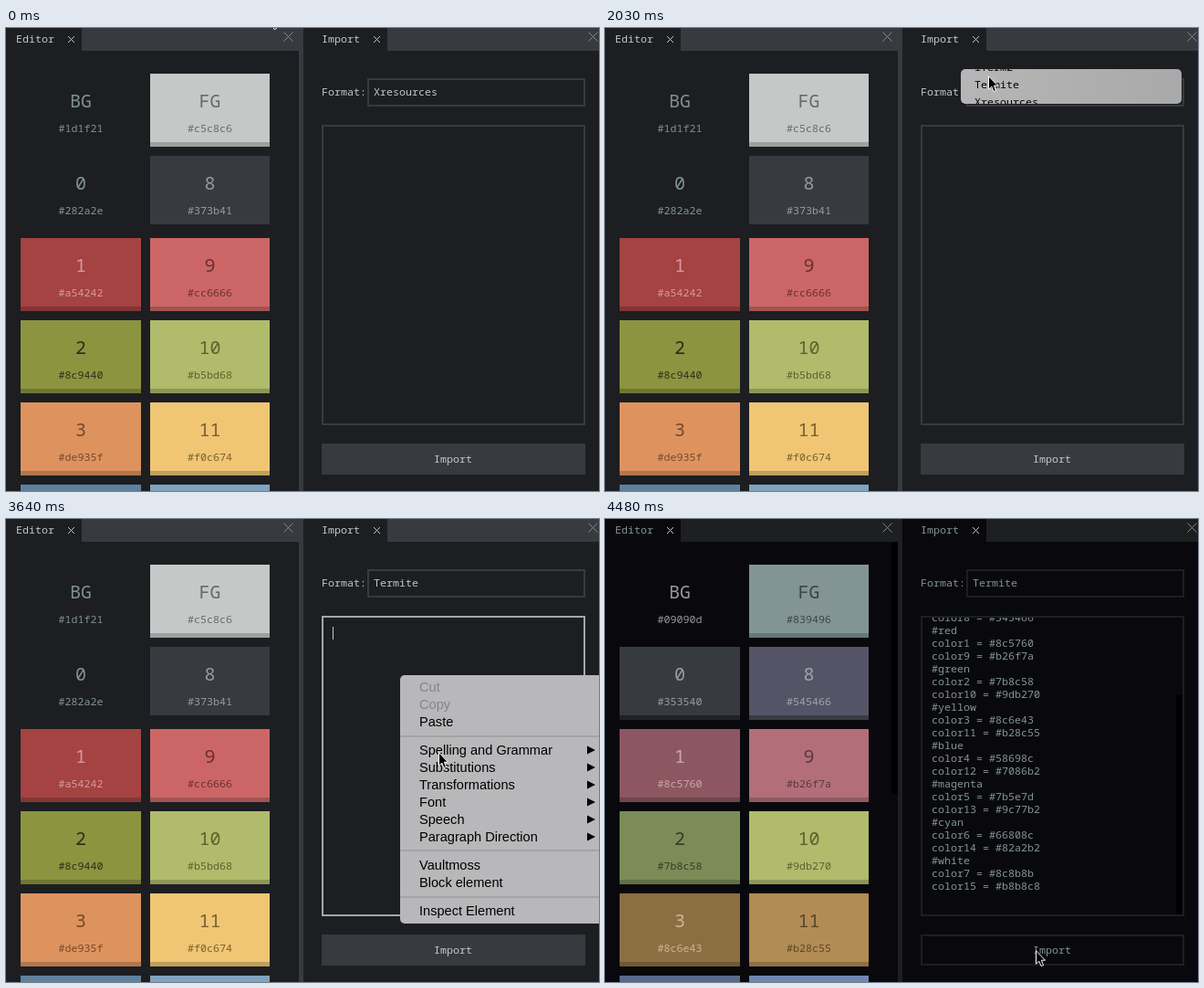
An HTML page that plays this animation: 650x507 px, repeating every 5.74 s.

```html
<!DOCTYPE html>
<html lang="en">
<head>
<meta charset="utf-8">
<title>Theme import</title>
<style>
  html, body { margin: 0; width: 100%; height: 100%; overflow: hidden; background: #1d1f21; }
  svg {
    --bg: #1c1e21; --bar: #373b40; --text: #c5c8c6;
    display: block; width: 650px; height: 507px; background: var(--bg);
    font: 11.667px "Noto Sans Mono", monospace;
  }
  svg.dark { --bg: #09090d; --bar: #1d1f21; --text: #839496; }
  text { fill: var(--text); white-space: pre; }
  rect { shape-rendering: crispEdges; }
  .bg { fill: var(--bg); }
  .bar { fill: var(--bar); }
  .box { fill: none; stroke: var(--bar); stroke-width: 2; }
  .box.focus { stroke: #a5a7a7; }
  .x { fill: none; stroke: #c5c8c6; }
  .x.dim { stroke: #85888b; }
  .mid { text-anchor: middle; }
  .big { font-size: 20px; }
  .round { shape-rendering: auto; fill: #b8b8ba; }
  .pop text { fill: #000; }
  .pop .off { fill: #848486; }
  .pop .on { fill: #fff; }
  .hot { fill: #0059c4; }
  .tick { fill: none; stroke: #000; stroke-width: 2; }
  .tick.on { fill: none; stroke: #fff; }
  #context { font: 14.6px "Liberation Sans", Arial, sans-serif; }
</style>
</head>
<body>
<svg id="stage" viewBox="0 0 650 507">
  <defs>
    <clipPath id="areaClip"><rect x="348" y="108" width="285" height="325"/></clipPath>
    <clipPath id="shrinkClip"><rect x="390" y="45" width="242" height="38" rx="5"/></clipPath>
    <linearGradient id="glass"><stop stop-color="#b6b6b6"/><stop offset="1" stop-color="#a9a9aa"/></linearGradient>
  </defs>

  <rect class="bar" x="83" width="243" height="25"/>
  <rect class="bar" x="321" width="5" height="507"/>
  <rect class="bar" x="418" width="232" height="25"/>
  <text x="11" y="16">Editor</text>
  <text x="346" y="16">Import</text>
  <path class="x" d="M68 9l7 7m0-7l-7 7M403 9l7 7m0-7l-7 7"/>
  <path class="x dim" d="M304.500 4.500l10 10m0-10l-10 10M638.500 4.500l10 10m0-10l-10 10"/>

  <g id="before"></g>
  <g id="after"></g>

  <text x="346" y="74">Format:</text>
  <rect class="box" x="397" y="56" width="237" height="29"/>
  <text id="format" x="403" y="74"></text>

  <rect id="area" class="box" x="347" y="107" width="287" height="327"/>
  <g id="pasted" clip-path="url(#areaClip)"></g>
  <rect id="caret" x="358" width="1" height="14" fill="#c5c8c6"/>

  <rect id="button" class="bar" x="346" y="455" width="289" height="34"/>
  <rect id="hover" class="box" x="347" y="456" width="287" height="32"/>
  <text class="mid" x="490" y="476">Import</text>

  <g id="scrollbars">
    <rect x="314" y="25" width="7" height="276"/>
    <rect x="626" y="193" width="7" height="240"/>
  </g>

  <g id="dropdown" class="pop"></g>
  <g id="shrink" class="pop" clip-path="url(#shrinkClip)">
    <rect x="390" y="45" width="242" height="38" fill="url(#glass)"/>
    <text x="405" y="47">iTerm2</text>
    <text x="405" y="66">Termite</text>
    <text x="405" y="85">Xresources</text>
  </g>
  <g id="context" class="pop"></g>

  <path id="cursor" d="M.5 .8V15.200L3.800 12.200L6 17.500L8.500 16.500L6.300 11.200H10.500Z" stroke="#fff"/>
</svg>

<script>
const LOOP = 5740, STEP = 70;
const $ = id => document.getElementById(id);
const show = (id, on) => { $(id).style.display = on ? '' : 'none'; };
const rect = (x, y, w, h, attrs) => `<rect x="${x}" y="${y}" width="${w}" height="${h}" ${attrs}/>`;
const text = (x, y, s, attrs = '') => `<text x="${x}" y="${y}" ${attrs}>${s}</text>`;

// Swatch: label, hex, ink, then optional shown fill and strip colour
const before = [
  ['BG', '1d1f21', '#7f9090', 'none', 'none'], ['FG', 'c5c8c6', '#676a69'],
  [0, '282a2e', '#839496', 'none', 'none'], [8, '373b41', '#989b9e', '#373b40', 'none'],
  [1, 'a54242', '#d49c9c'], [9, 'cc6666', '#6b2f31'],
  [2, '8c9440', '#2b2e1b'], [10, 'b5bd68', '#5b612f', '#b0bb6b'],
  [3, 'de935f', '#75492c'], [11, 'f0c674', '#75602f'],
  [4, '5f819d', '#263440'], [12, '81a2be', '#34424e']
];
const after = [
  ['BG', '09090d', '#97999a', 'none', 'none'], ['FG', '839496', '#394446'],
  [0, '353540', '#9b9da2', '#373a3e', '#202225'], [8, '545466', '#a4a4ae', '#545466', '#3a3b43'],
  [1, '8c5760', '#cfa6ac'], [9, 'b26f7a', '#5c383e'],
  [2, '7b8c58', '#343c28'], [10, '9db270', '#596032', '#b0bb6b'],
  [3, '8c6e43', '#cdb593'], [11, 'b28c55', '#594628'],
  [4, '58698c', '#b0b9cc'], [12, '7086b2', '#333e54']
];

function swatches(list) {
  return list.map(([label, hex, ink, fill = '#' + hex, strip], i) => {
    const x = i % 2 ? 158 : 16, w = i % 2 ? 131 : 132, y = 50 + 90 * (i >> 1);
    const mid = x + w / 2, style = `class="mid" style="fill:${ink}"`;
    const edge = strip ? `fill="${strip}"` : 'fill="#000" fill-opacity=".2"';
    return rect(x, y, w, strip ? 75 : 80, `fill="${fill}"`) + rect(x, y + 75, w, 5, edge) +
      text(mid, y + 37, label, style.replace('mid', 'mid big')) +
      text(mid, y + 64, '#' + hex, style);
  }).join('');
}

function pastedLines() {
  const groups = [
    ['red', '8c5760', 'b26f7a'], ['green', '7b8c58', '9db270'], ['yellow', '8c6e43', 'b28c55'],
    ['blue', '58698c', '7086b2'], ['magenta', '7b5e7d', '9c77b2'],
    ['cyan', '66808c', '82a2b2'], ['white', '8c8b8b', 'b8b8c8']
  ];
  const lines = ['color8 = #545466'];
  groups.forEach(([name, normal, bright], i) =>
    lines.push('#' + name, `color${i + 1} = #${normal}`, `color${i + 9} = #${bright}`));
  return lines.map((line, i) => text(358, 112 + 14 * i, line)).join('');
}

function dropdown(hot) {
  const rows = ['iTerm2', 'Termite', 'Xresources'].map((name, i) => {
    const y = 36 + 19 * i, on = i === hot ? 'on' : '';
    return (on && rect(386, y - 9, 239, 19, 'class="hot"')) +
      text(407, y + 4, name, `class="${on}"`) +
      (i === 2 ? `<path class="tick ${on}" d="M391 ${y - 1}l3.500 4.500l6-10"/>` : '');
  });
  return rect(386, 22, 239, 65, 'class="round" rx="5"') + rows.join('');
}

const menu = [
  ['Cut', 184], ['Copy', 203], ['Paste', 222], ['Spelling and Grammar', 253],
  ['Substitutions', 272], ['Transformations', 291], ['Font', 310], ['Speech', 329],
  ['Paragraph Direction', 348], ['Vaultmoss', 379], ['Block element', 398], ['Inspect Element', 429]
];
function contextMenu(hot) {
  const rows = menu.map(([name, y], i) => {
    const cls = i < 2 ? 'off' : i === hot ? 'on' : '';
    const arrow = i > 2 && i < 9
      ? `<path d="M637 ${y - 4.5}l9 4.500l-9 4.500z" fill="${cls ? '#fff' : '#000'}"/>` : '';
    return (cls === 'on' ? rect(432, y - 9, 218, 19, 'class="hot"') : '') +
      text(453, y + 5, name, `class="${cls}"`) + arrow;
  });
  const rules = [237, 362, 413].map(y => rect(432, y, 218, 2, 'fill="#a4a4a6"'));
  return rect(432, 171, 230, 272, 'class="round" rx="5"') + rules.join('') + rows.join('');
}

// Pointer moves: first step, last step, target x, y
const moves = [
  [210, 630, 411, 67], [980, 1050, 415, 67], [1470, 1750, 420, 52], [2100, 2450, 428, 170],
  [3150, 3220, 468, 271], [3290, 3360, 473, 221], [3640, 3780, 475, 354], [3850, 4130, 472, 472]
];
function pointer(t) {
  let x = 288, y = -16;
  for (const [from, to, tx, ty] of moves) {
    if (t < from) break;
    const p = Math.min(1, (t - from + STEP) / (to - from + STEP));
    const ease = p * p * (3 - 2 * p);
    x += (tx - x) * ease;
    y += (ty - y) * ease;
  }
  return [Math.round(x), Math.round(y)];
}

const fade = t => t < 3710 ? 1 : t < 3780 ? .85 : t < 3850 ? .62 : .3;

function render(t) {
  const between = (a, b) => t >= a && t < b;
  const [x, y] = pointer(t);
  const dark = t >= 4480, pasted = t >= 3850, hover = t >= 3850 && y >= 455;

  $('stage').classList.toggle('dark', dark);
  show('before', !dark);
  show('after', dark);
  show('scrollbars', dark);

  $('format').textContent = t < 2030 ? 'Xresources' : 'Termite';
  show('dropdown', between(1260, 2030));
  if (between(1260, 2030)) $('dropdown').innerHTML = dropdown(t >= 1960 ? -1 : y < 64 ? 1 : 2);
  show('shrink', between(2030, 2100));

  const focus = between(2450, 4340);
  $('area').classList.toggle('focus', focus);
  show('caret', focus);
  $('caret').setAttribute('y', pasted ? 409 : 118);
  show('pasted', pasted);

  show('context', between(3010, 3920));
  if (between(3010, 3920)) {
    const hot = between(3150, 3640) ? menu.findIndex(([, row]) => Math.abs(y - row) < 9.5) : -1;
    $('context').innerHTML = contextMenu(hot);
    $('context').setAttribute('opacity', fade(t));
  }

  show('button', !hover);
  show('hover', hover);
  $('cursor').setAttribute('transform', `translate(${x} ${y})`);
}

$('before').innerHTML = swatches(before);
$('after').innerHTML = swatches(after);
$('pasted').innerHTML = pastedLines();

const start = performance.now();
let last = -1;
function tick() {
  const t = Math.floor((performance.now() - start) % LOOP / STEP) * STEP;
  if (t !== last) render(last = t);
  requestAnimationFrame(tick);
}
tick();
</script>
</body>
</html>
```
